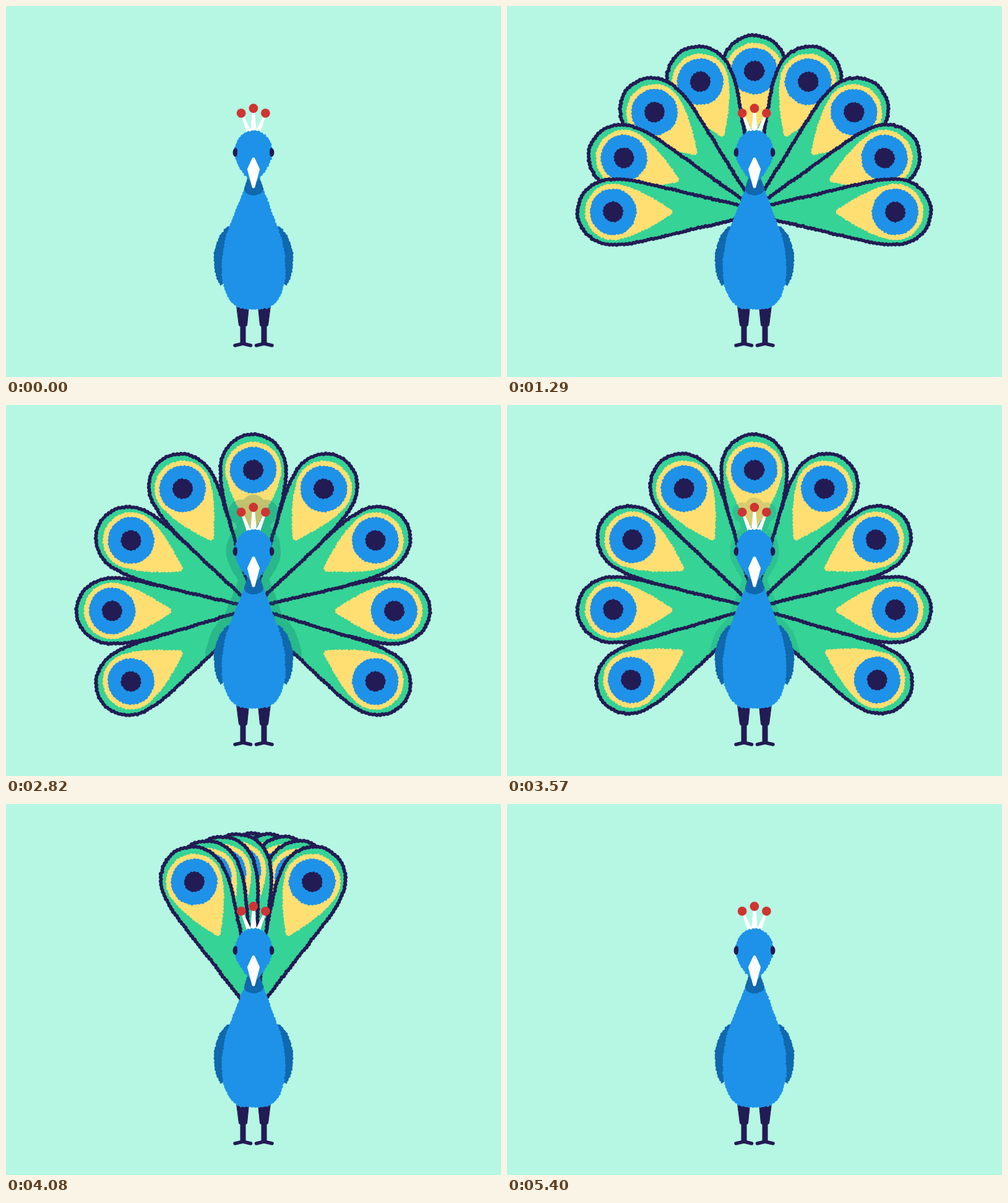
An HTML page for the animation above (5.43 s loop, 800 by 600 pixels).

```html
<!DOCTYPE html>
<html lang="en">
<head>
<meta charset="utf-8">
<title>Peacock</title>
<style>
  html, body { margin: 0; width: 100%; height: 100%; overflow: hidden; background: #b5f7e3; }
  svg { display: block; width: 100%; height: 100%; }
</style>
</head>
<body>
<svg viewBox="0 0 800 600">
  <defs>
    <path id="plume" data-rough="1.2" d="M5 0L45 -170C49.500 -189 53 -207 53 -228C53 -260 30 -285.500 0 -285.500C-30 -285.500 -53 -260 -53 -228C-53 -207 -49.500 -189 -45 -170L-5 0Q0 6 5 0Z"/>
    <path id="drop" data-rough="1.2" d="M3 -133C14 -150 37 -185 43 -213A45.5 45.5 0 1 0 -43 -213C-37 -185 -14 -150 -3 -133Q0 -130 3 -133Z"/>
    <path id="iris" data-rough="1.2" d="M37.5 -228A37.5 37.5 0 1 0 -37.5 -228A37.5 37.5 0 1 0 37.5 -228Z"/>
    <path id="pupil" data-rough="1.1" d="M16.5 -228A16.5 16.5 0 1 0 -16.5 -228A16.5 16.5 0 1 0 16.5 -228Z"/>
    <path id="body" data-rough="1.2" d="M385 296C377 316 370 334 362 354C352 380 348 405 349 432C350 465 365 490 385 490Q400 491 415 490C436 490 450 465 451.500 432C452 405 448 380 438 354C430 334 424 316 416 296Z"/>
    <path id="wing" data-rough="1.2" d="M362 354C343 366 336 390 336 410C336 428 340 442 346 452Q349 454 351 449L356 400Z"/>
    <path id="head" data-rough="1.2" d="M400 201C418 201 430.500 217 430.500 236C430.500 254 417 270 410 279Q400 288 390 279C383 270 369.500 254 369.500 236C369.500 217 382 201 400 201Z"/>
    <path id="neck" data-rough=".5" d="M393 270L384 297L388 303Q400 309.500 412 303L417 297L407 270Z"/>
    <path id="stems" d="M398 168H402L405 203H395ZM379 174L382 173L396 202L389 204ZM421 174L418 173L404 202L411 204Z"/>
    <path id="dots" d="M372.700 173.300a7.400 7.400 0 1 1 14.800 0a7.400 7.400 0 1 1 -14.800 0ZM392.500 165.500a7.400 7.400 0 1 1 14.800 0a7.400 7.400 0 1 1 -14.800 0ZM412 173.300a7.400 7.400 0 1 1 14.800 0a7.400 7.400 0 1 1 -14.800 0Z"/>
    <path id="eye" d="M371.500 229.500C365 230 365 243.500 371 244Q374 243 374 236.500Q374 230 371.500 229.500Z"/>
    <g id="leg" stroke="#231b54" stroke-linecap="round" stroke-linejoin="round">
      <path d="M373 486H392.500L389.500 516Q389 518 387 518V546H379V518Q377 518 376.500 516Z"/>
      <path d="M370 549L383 546L395.500 549" fill="none" stroke-width="5.500"/>
    </g>
    <g id="feather">
      <use href="#plume" fill="#35d396" stroke="#231b54" stroke-width="5.300"/>
      <use href="#drop" fill="#ffdf72"/>
      <use href="#iris" fill="#1e92e8"/>
      <use href="#pupil" fill="#231b54"/>
    </g>
    <clipPath id="fanClip"></clipPath>
  </defs>

  <rect width="800" height="600" fill="#b5f7e3"/>
  <g id="fan"></g>

  <g clip-path="url(#fanClip)">
    <g id="shadow" fill="#0a6a6a" stroke="#0a6a6a" stroke-linejoin="round">
      <use href="#body"/><use href="#neck"/><use href="#head"/>
      <use href="#stems"/><use href="#dots"/><use href="#wing"/>
      <use href="#wing" transform="matrix(-1 0 0 1 800 0)"/>
    </g>
  </g>

  <g fill="#231b54">
    <use href="#leg"/>
    <use href="#leg" transform="matrix(-1 0 0 1 800 0)"/>
  </g>
  <g fill="#1068ae">
    <use href="#wing"/>
    <use href="#wing" transform="matrix(-1 0 0 1 800 0)"/>
  </g>
  <use href="#body" fill="#1e92e8"/>
  <use href="#neck" fill="#1068ae"/>
  <g id="face">
    <use href="#stems" fill="#fff"/>
    <use href="#dots" fill="#cf3432"/>
    <use href="#head" fill="#1e92e8"/>
    <g fill="#231b54">
      <use href="#eye"/>
      <use href="#eye" transform="matrix(-1 0 0 1 800 0)"/>
    </g>
    <path d="M400 247.500L392.500 264L400 292L407.500 264Z" fill="#fff" stroke="#fff" stroke-width="5" stroke-linejoin="round"/>
  </g>
</svg>
<script>
const LOOP = 5430, STEP = 30;
const NS = 'http://www.w3.org/2000/svg';
const $ = id => document.getElementById(id);

let seed = 11;
const random = () => (seed = seed * 16807 % 2147483647) / 2147483647;
const clamp = v => Math.min(1, Math.max(0, v));
const smooth = u => u * u * (3 - 2 * u);
const ramp = (t, start, length) => smooth(clamp((t - start) / length));

// Cubic timing curve (.33, 0, .4, 1), solved by bisection.
function swing(u) {
  let lo = 0, hi = 1;
  for (let i = 0; i < 24; i++) {
    const s = (lo + hi) / 2, r = 1 - s;
    if (3 * r * r * s * 0.33 + 3 * r * s * s * 0.4 + s * s * s < u) lo = s; else hi = s;
  }
  return smooth(lo);
}
const sweep = (t, start, length) => swing(clamp((t - start) / length));

// Sample an outline into points with normals; alternate points push in and out.
function roughen(path) {
  const total = path.getTotalLength();
  const count = 2 * Math.round(total / 6);
  const at = i => path.getPointAtLength((i + count) % count * total / count);
  const points = Array.from({ length: count }, (_, i) => {
    const p = at(i), a = at(i - 1), b = at(i + 1);
    const len = Math.hypot(b.x - a.x, b.y - a.y) || 1;
    return {
      x: p.x, y: p.y, nx: (b.y - a.y) / len, ny: (a.x - b.x) / len,
      push: (i % 2 ? 1 : -1) * (0.5 + random()), phase: random() * 2 * Math.PI
    };
  });
  return { path, points, amp: +path.dataset.rough };
}

function wobble({ path, points, amp }, angle) {
  const moved = points.map(p => {
    const d = amp * p.push * (1 + 0.3 * Math.sin(p.phase + angle));
    return [p.x + p.nx * d, p.y + p.ny * d];
  });
  const mid = (a, b) => ((a[0] + b[0]) / 2).toFixed(2) + ' ' + ((a[1] + b[1]) / 2).toFixed(2);
  let d = 'M' + mid(moved[moved.length - 1], moved[0]);
  moved.forEach((p, i) => {
    d += 'Q' + p[0].toFixed(2) + ' ' + p[1].toFixed(2) + ' ' + mid(p, moved[(i + 1) % moved.length]);
  });
  path.setAttribute('d', d + 'Z');
}

function addUse(parent, href) {
  const use = document.createElementNS(NS, 'use');
  use.setAttribute('href', href);
  return parent.appendChild(use);
}

const outlines = [...document.querySelectorAll('[data-rough]')].map(roughen);
// Back to front: centre, right side outwards, left side outwards.
const feathers = [0, 1, 2, 3, 4, -1, -2, -3, -4].map(slot => ({
  slot,
  parts: [addUse($('fan'), '#feather'), addUse($('fanClip'), '#plume')]
}));

function headTilt(t) {
  const left = ramp(t, 330, 270), right = ramp(t, 600, 270), back = ramp(t, 870, 270);
  return 9.5 * (-left + 2 * right - back);
}

function draw(t) {
  const size = ramp(t, 510, 330) - ramp(t, 4230, 360);
  const spread = 120 * (sweep(t, 755, 965) - sweep(t, 3531, 930));
  const shade = ramp(t, 1650, 400) - ramp(t, 3430, 350);

  outlines.forEach(o => wobble(o, t / LOOP * 4 * Math.PI));
  feathers.forEach(({ slot, parts }) => {
    const place = `translate(399.5 333) rotate(${slot * spread / 4}) scale(${Math.max(size, 0.001)})`;
    parts.forEach(part => part.setAttribute('transform', place));
  });
  $('fan').style.display = size > 0.001 ? '' : 'none';
  $('shadow').setAttribute('stroke-width', 26 * shade);
  $('shadow').setAttribute('opacity', 0.25 * shade);
  $('face').setAttribute('transform', `rotate(${headTilt(t)} 400 227)`);
}

const began = performance.now();
function tick() {
  const t = (performance.now() - began) % LOOP;
  draw(Math.floor(t / STEP) * STEP);
  requestAnimationFrame(tick);
}
tick();
</script>
</body>
</html>
```
